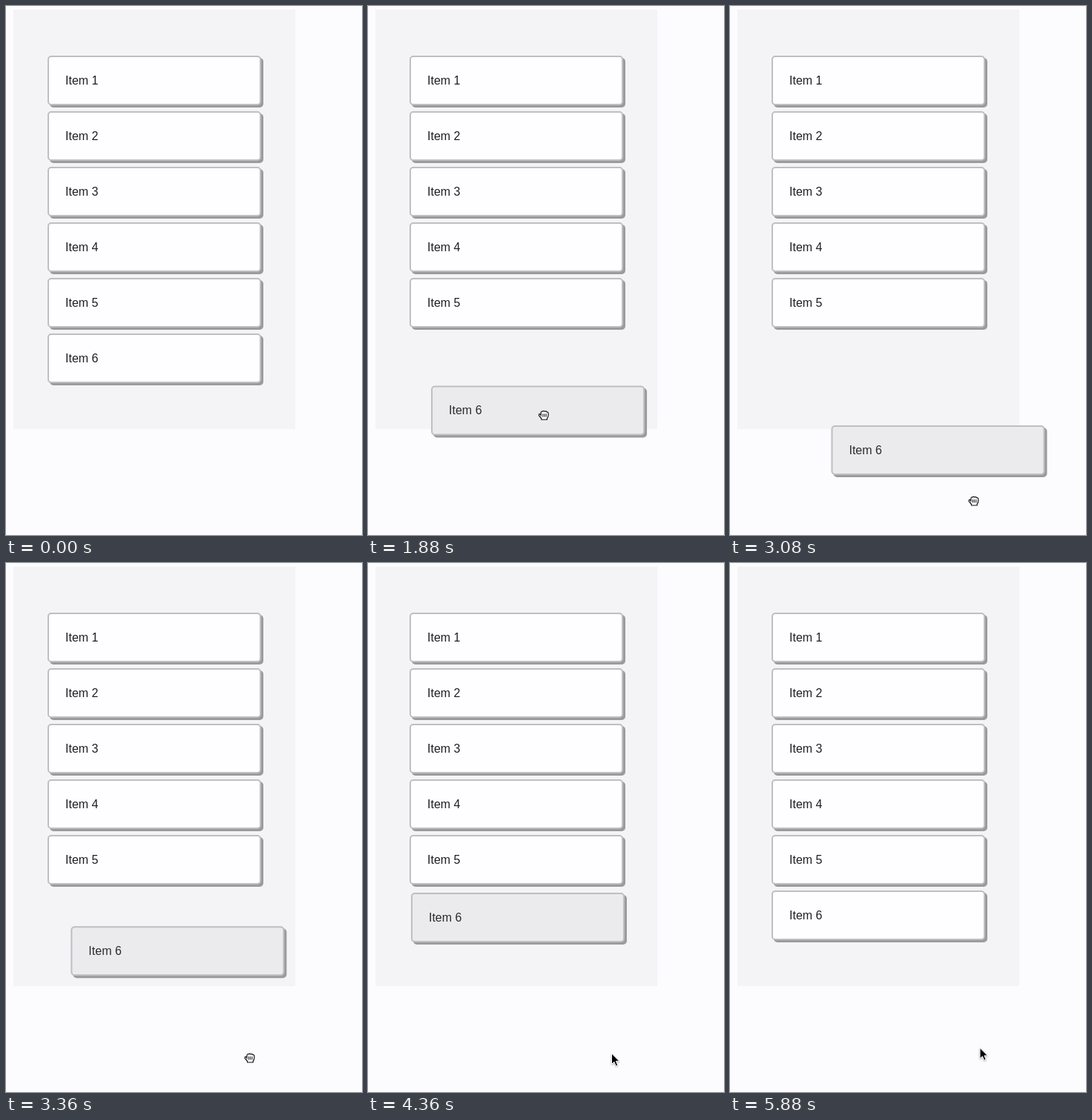
Animation of 480x714 px, one loop 6.72 s. Source, as an HTML page:

```html
<!DOCTYPE html>
<html lang="en">
<head>
<meta charset="utf-8">
<style>
  html, body { margin: 0; width: 100%; height: 100%; overflow: hidden; background: #fcfbfe; }
  #panel { position: absolute; left: 10px; top: 5px; width: 380px; height: 566px; background: #f4f3f5; }
  .item {
    position: absolute; left: 56px; box-sizing: border-box; width: 288px; height: 67px;
    padding-left: 22px; border: 2px solid #bfbec1; border-radius: 5px;
    box-shadow: 3px 3px 0 #9b9a9d; background: #fefdff; color: #202022;
    font: 16px/63px "Liberation Sans", Arial, sans-serif;
  }
  .item.dragged { background: #ebeaec; color: #2c2c2e; }
  svg { position: absolute; left: 0; top: 0; width: 480px; height: 714px; }
  .hand { fill: #fff; stroke: #111; stroke-width: 1.2; stroke-linejoin: round; stroke-linecap: round; }
  #arrow { stroke: #fff; stroke-width: 1; filter: drop-shadow(0 1px 1px #0005); }
</style>
</head>
<body>
<div id="panel"></div>
<svg viewBox="0 0 480 714">
  <path id="arrow" d="M0 0V14.5L3.4 11.3 5.7 16.8 8.2 15.7 5.9 10.4H10.4Z"/>
  <g id="open" class="hand">
    <path d="M-4 1L-6-4Q-5.5-6-4-5L-2-1-2.5-7Q-1.5-8.5-.5-7L.3-2 1-8Q2.2-9 3-7.5V-2L4.5-6.5Q6-7.5 6.5-5.5L6 2 4.5 5V7.5H-3V5.5L-8 .5Q-8.5-1.5-6.5-1Z"/>
  </g>
  <g id="closed" class="hand">
    <path d="M-3.6 1V-3.5Q-3.3-5.5-1.7-5Q0-6.4 1.4-5Q3-5.8 4-4.3Q6-4.5 6.3-2.5V0Q6 3 4.6 4.5V6H-3V4.5L-6 1.2Q-7-1-5.5-1.6Q-4.5-1.6-3.6 0"/>
    <path d="M-1-1.5V2M1.2-1.5V2M3.4-1.5V2" stroke-width="1"/>
  </g>
</svg>
<script>
const LOOP = 6720, STEP = 40;
const PRESS = 1220, DRAG_END = 2460, RELEASE = 2900, SETTLED = 5320;
const DROP = [124, 191];
const cursors = ["arrow", "open", "closed"].map(id => document.getElementById(id));
const svg = document.querySelector("svg");

const items = Array.from({ length: 6 }, (_, i) => {
  const el = document.createElement("div");
  el.className = "item";
  el.textContent = `Item ${i + 1}`;
  el.style.top = `${67 + 75 * i}px`;
  svg.before(el);
  return el;
});
const card = items[5];

const progress = (t, a, b) => Math.min(1, Math.max(0, (t - a) / (b - a)));
const smooth = p => p * p * (3 - 2 * p);
const easeOut = p => 1 - (1 - p) ** 2;
const curve = (p, from, via, to) =>
  from.map((v, i) => (1 - p) ** 2 * v + 2 * p * (1 - p) * via[i] + p * p * to[i]);

// Share of the drop offset that remains while the card glides home.
const decay = [[RELEASE, 1], [3080, .649], [3560, .129], [3720, .08], [4360, .016], [5000, .005], [SETTLED, .003]];
function remaining(t) {
  if (t >= SETTLED) return 0;
  const i = decay.findIndex(([time]) => time > t);
  const [t0, r0] = decay[i - 1], [t1, r1] = decay[i];
  return r0 * (r1 / r0) ** progress(t, t0, t1);
}

const dragOffset = t => curve(smooth(progress(t, PRESS, DRAG_END)), [0, 0], [-10, 36], DROP);

function cardOffset(t) {
  return t < RELEASE ? dragOffset(t - 20) : DROP.map(v => v * remaining(t));
}

function cursorState(t) {
  if (t < 800) return ["arrow", curve(easeOut(progress(t, 60, 520)), [450, 502], [330, 362], [204, 468])];
  if (t < 3640) {
    const [x, y] = dragOffset(t);
    return [t < 920 ? "open" : "closed", [204.5 + x, 477 + y]];
  }
  const p = smooth(progress(t, 4400, 4720));
  return ["arrow", [328.5 + 8.5 * p, 662 - 7.5 * p]];
}

function render(t) {
  const [x, y] = cardOffset(t);
  card.style.transform = `translate(${x}px, ${y}px)`;
  card.classList.toggle("dragged", t >= 1240 && t < 5880);

  const [kind, [cx, cy]] = cursorState(t);
  for (const el of cursors) {
    el.style.display = el.id === kind && t >= 80 ? "" : "none";
    el.setAttribute("transform", `translate(${cx} ${cy})`);
  }
}

const start = performance.now();
function tick() {
  const t = (performance.now() - start) % LOOP;
  render(Math.floor(t / STEP) * STEP);
  requestAnimationFrame(tick);
}
tick();
</script>
</body>
</html>
```
